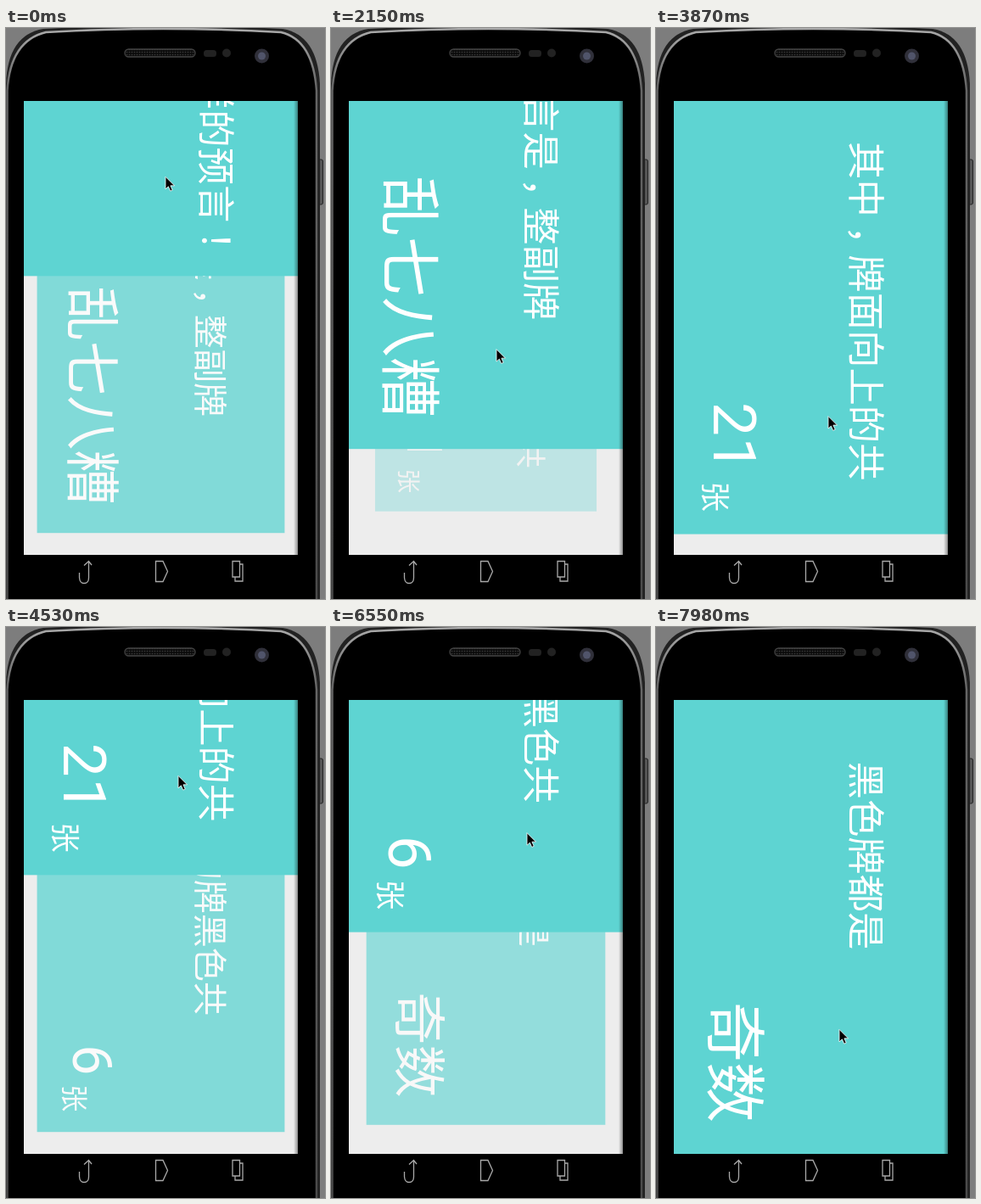
An HTML page for the animation above (8000 ms loop, 376 by 673 pixels).

```html
<!DOCTYPE html>
<html lang="zh-CN">
<head>
<meta charset="utf-8">
<title>Card pager</title>
<style>
html, body { margin: 0; height: 100%; overflow: hidden; background: #7d7d7d; }
svg { display: block; width: 100vw; height: 100vh; }
text { fill: #fff; font-family: "Noto Sans CJK SC", "Noto Sans CJK", sans-serif; }
.num { font-family: Roboto, "Open Sans", sans-serif; letter-spacing: 1.5px; }
.icon { fill: none; stroke: #a9a9a9; stroke-width: 1.3; }
</style>
</head>
<body>
<svg viewBox="0 0 376 673">
  <defs>
    <clipPath id="screen"><rect x="21" y="86" width="323" height="535"/></clipPath>
    <linearGradient id="edge">
      <stop offset="0" stop-color="#000" stop-opacity="0"/>
      <stop offset="1" stop-color="#000" stop-opacity=".4"/>
    </linearGradient>
    <linearGradient id="rim" x2="0" y2="1">
      <stop offset="0" stop-color="#aaa"/>
      <stop offset=".1" stop-color="#666"/>
      <stop offset="1" stop-color="#4a4a4a"/>
    </linearGradient>
    <pattern id="mesh" width="3" height="3" patternUnits="userSpaceOnUse">
      <rect width="3" height="3" fill="#0c0c0c"/>
      <circle cx="1.5" cy="1.5" r=".8" fill="#3a3a3a"/>
    </pattern>
  </defs>

  <!-- phone body -->
  <rect x="368" y="155" width="5.5" height="53" rx="2" fill="#555" stroke="#222"/>
  <path d="M0 680V66Q2 8 44 1Q185 -6 326 1Q367 8 370 66V680Z" fill="#222"/>
  <path d="M1.5 680V74Q5 15 47 5Q185 -3 324 5Q362 14 366 74V680Z" fill="#000" stroke="url(#rim)" stroke-width="2.5"/>
  <rect x="140" y="25" width="83" height="9" rx="4.5" fill="url(#mesh)" stroke="#444" stroke-width="1.3"/>
  <rect x="233" y="26" width="15" height="8" rx="3.5" fill="#222"/>
  <circle cx="260" cy="29.5" r="5" fill="#222"/>
  <circle cx="301.5" cy="33" r="8.5" fill="#30303a"/>
  <circle cx="301.5" cy="33" r="4.5" fill="#50546a"/>

  <!-- navigation keys -->
  <g class="icon">
    <path d="M86.5 642V648Q87 654.5 92 654.5Q97.500 654.5 97.500 648V629M92 633.5L97.500 628.5L101 633"/>
    <path d="M176.5 628.5H185L190.5 640.5L185 652.5H176.5Z"/>
    <path d="M267 628.5H275.5V647H267ZM275.5 632H279V652H270V647"/>
  </g>

  <!-- display -->
  <g clip-path="url(#screen)">
    <rect x="21" y="86" width="323" height="535" fill="#ededed"/>
    <g id="pages"></g>
    <rect x="339" y="86" width="5" height="535" fill="url(#edge)"/>
  </g>
  <path id="cursor" d="M0 0V14.5L3.4 11.5L5.7 16.8L8.2 15.7L5.9 10.5H10.5Z" stroke="#fff" stroke-width=".8"/>
</svg>
<script>
const LOOP = 8000, TOP = 86, HEIGHT = 535, MID_X = 182.5, MID_Y = TOP + HEIGHT / 2;
const SMALL = 35.5, TITLE = 44.4, BIG = 71.2;
const HOME_Y = 520, REACH = 420, SETTLE = 560, RETURN = 620;

// title, large word, count
const cards = [
  ["　　　　　样的预言！", "", ""],
  ["预言是，整副牌", "乱七八糟", ""],
  ["其中，牌面向上的共", "", "21"],
  ["向上的牌黑色共", "", "6"],
  ["黑色牌都是", "奇数", ""]
];

// each swipe: drag start, drag length, start of the hand's way back, cursor x
const swipes = [
  { start: -852, drag: 1013, back: 420, x: 188 },
  { start: 1758, drag: 1013, back: 2850, x: 195 },
  { start: 3678, drag: 1013, back: 5350, x: 203 },
  { start: 6070, drag: 690, back: 7030, x: 231 },
  { start: 7834, drag: 1013, back: 9200, x: 216 }
];

const mix = (a, b, u) => a + (b - a) * u;
const clamp = u => Math.min(1, Math.max(0, u));
const smooth = u => u * u * (3 - 2 * u);
const easeOut = u => 1 - (1 - u) ** 4;

// The page ignores the first pixels of a drag, then catches up with the hand
const follow = travel => Math.max(0, travel - 16 - 400 * Math.exp(-travel / 21.5));

// Text turned a quarter clockwise: x is its baseline, y its start or end
function label(str, x, y, size, anchor = "start", cls = "") {
  return `<text class="${cls}" transform="translate(${x} ${y}) rotate(90)"
    font-size="${size}" text-anchor="${anchor}" xml:space="preserve">${str}</text>`;
}

// Punctuation sits in the middle of its square
const centred = str =>
  str.replace(/([，！])(.?)/g, '<tspan dx=".23em">$1</tspan><tspan dx="-.23em">$2</tspan>');

function card([title, word, count]) {
  return `<g><rect x="21" y="${TOP}" width="323" height="${HEIGHT}" fill="#5ed4d2"/>` +
    label(centred(title), 231.1, 158.5, TITLE) +
    (word && label(word, 66.5, 584, BIG, "end")) +
    (count && label(count, 67.5, 548.5, BIG, "end", "num") + label("张", 57, 559, SMALL)) +
    "</g>";
}

const pages = document.getElementById("pages");
const cursor = document.getElementById("cursor");
pages.innerHTML = cards.map(card).reverse().join("");
const groups = [...pages.children].reverse();

function place(g, d) {
  g.style.display = Math.abs(d) < 1 ? "" : "none";
  const behind = clamp(d);  // the next card rises from behind
  g.setAttribute("transform", d <= 0
    ? `translate(0 ${d * HEIGHT})`
    : `translate(${MID_X} ${MID_Y}) scale(${1 - behind / 4}) translate(${-MID_X} ${-MID_Y})`);
  g.setAttribute("opacity", 1 - behind ** 1.45);
}

function draw(t) {
  const n = swipes.findLastIndex(s => s.start <= t);
  const s = swipes[n], next = swipes[n + 1] || s;
  const travel = REACH * clamp((t - s.start) / s.drag) ** 1.15;
  const settle = easeOut(clamp((t - s.start - s.drag) / SETTLE));
  const scroll = n + mix(follow(travel), HEIGHT, settle) / HEIGHT;
  groups.forEach((g, i) => place(g, i - scroll));

  const home = smooth(clamp((t - s.back) / RETURN));
  const x = mix(s.x, next.x, home), y = HOME_Y - travel * (1 - home);
  cursor.setAttribute("transform", `translate(${x} ${y})`);
}

function tick() {
  draw(performance.now() % LOOP);
  requestAnimationFrame(tick);
}
tick();
</script>
</body>
</html>
```
